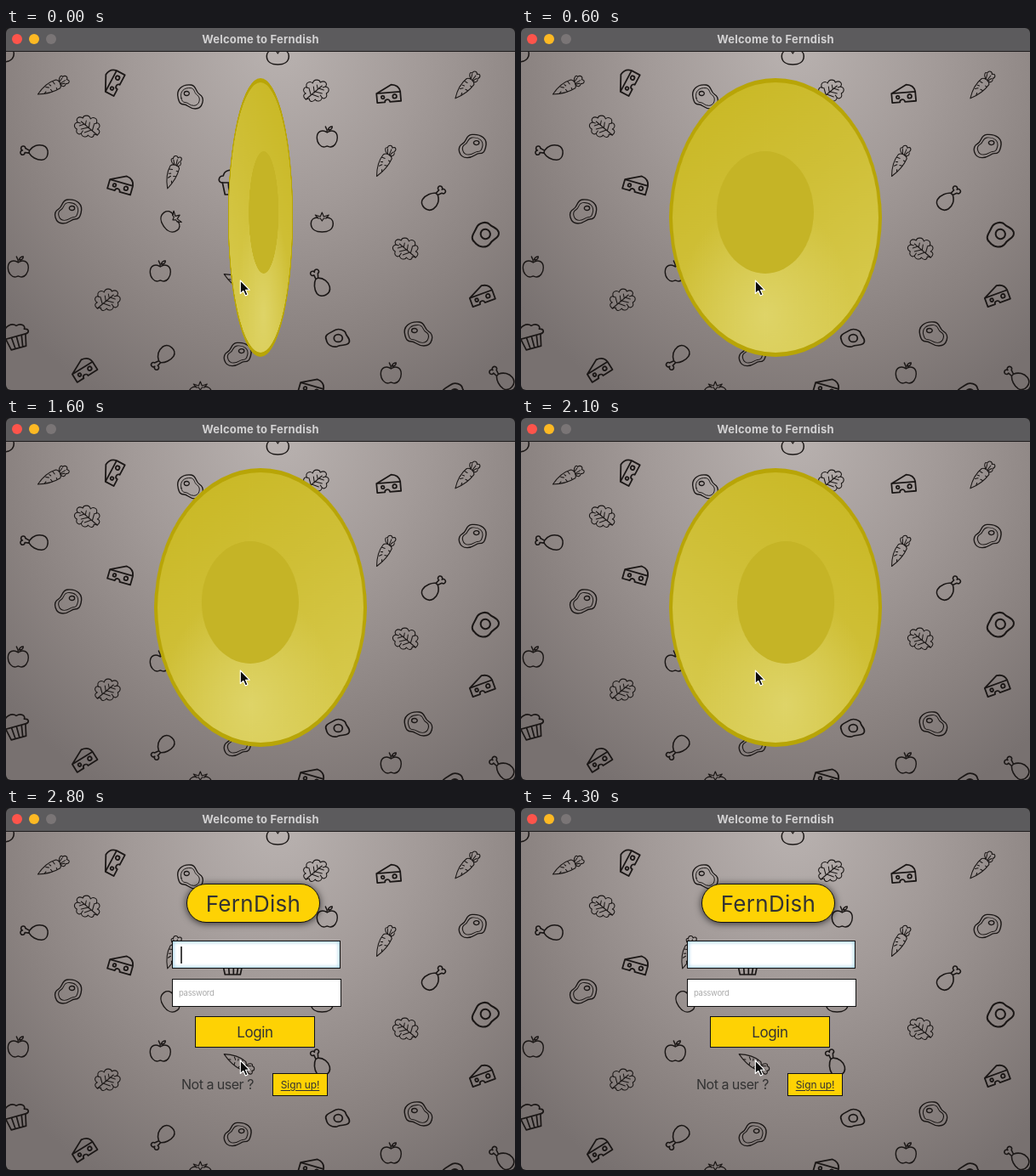
Write an HTML page that moves like this. It is 598 by 426 pixels and loops after 4.4 s.

```html
<!DOCTYPE html>
<html lang="en">
<head>
<meta charset="utf-8">
<title>Welcome to Ferndish</title>
<style>
  html, body { margin: 0; width: 100%; height: 100%; overflow: hidden; }
  body {
    position: relative;
    font-family: Inter, "Open Sans", sans-serif;
    color: #333;
    background: radial-gradient(ellipse 430px 470px at 320px 20px, #b9b2b0 0%, #a29a98 40%, #8a8280 75%, #787170 100%);
  }
  body > *, #login > * { position: absolute; box-sizing: border-box; }
  .scene { left: 0; top: 0; width: 598px; height: 426px; }
  #window { border-radius: 6px; box-shadow: 0 0 0 6px #1c1b1c; }

  #bar {
    left: 0; top: 0; width: 598px; height: 28px;
    background: #5c5b5d; border-bottom: 1px solid #1d1b1c;
    color: #d2d1d2; font-weight: 700; font-size: 13px; letter-spacing: .2px;
    line-height: 26px; text-align: center;
  }
  #bar i { position: absolute; top: 7px; width: 12px; height: 12px; border-radius: 50%; }

  .food { fill: none; stroke: #1b1716; stroke-linecap: round; stroke-linejoin: round; }

  #disc {
    left: 135px; top: 58.5px; width: 328px; height: 328px;
    border-radius: 50%; border: 5px solid #b8a507;
    background:
      radial-gradient(circle at 45% 86%, rgba(226, 217, 116, .75), rgba(226, 217, 116, 0) 42%),
      linear-gradient(150deg, #c9b824 5%, #cfbf36 45%, #d8cb50 95%);
    animation: spin 4.4s steps(44) infinite, intro 4.4s step-end infinite;
  }
  #disc i {
    position: absolute; left: 68px; top: 81px; width: 150px; height: 144px;
    border-radius: 50%; background: #c5b426;
  }
  /* one turn per second */
  @keyframes spin { from { transform: rotateY(-256.5deg); } to { transform: rotateY(1327.5deg); } }
  @keyframes intro { 0% { visibility: visible; } 63.636%, 100% { visibility: hidden; } }

  #login { animation: login 4.4s step-end infinite; }
  @keyframes login { 0% { visibility: hidden; } 63.636%, 100% { visibility: visible; } }

  .box { border: 1px solid #111; background: #fed204; text-align: center; white-space: nowrap; }
  #brand {
    left: 212px; top: 89px; width: 157px; height: 46px; border-radius: 23px;
    font-size: 26px; line-height: 46px; letter-spacing: .3px;
    box-shadow: 0 1px 9px rgba(0, 0, 0, .7);
  }
  .field { left: 195px; height: 33px; background: #fff; text-align: left; }
  #user { top: 156px; width: 198px; box-shadow: inset 0 0 4px 1px #9fd0ea; }
  #pass {
    top: 201px; width: 199px; padding-left: 7px;
    font-size: 9.5px; line-height: 31px; letter-spacing: -.3px; color: #aaa;
  }
  #caret {
    left: 205px; top: 163px; width: 1.5px; height: 20px; background: #444;
    animation: blink 4.4s step-end infinite;
  }
  @keyframes blink {
    0% { opacity: 1; }
    72.727% { opacity: 0; }
    84.091% { opacity: 1; }
    95.454%, 100% { opacity: 0; }
  }
  #enter { left: 222px; top: 245px; width: 141px; height: 37px; font-size: 17px; line-height: 36px; letter-spacing: -.4px; }
  #ask { left: 206px; top: 315px; font-size: 16px; line-height: 20px; letter-spacing: -.5px; white-space: nowrap; }
  #join {
    left: 313px; top: 312px; width: 65px; height: 27px;
    font-size: 12px; line-height: 26px; letter-spacing: -.1px;
    text-decoration: underline; text-underline-offset: 2px;
  }
</style>
</head>
<body>
<svg class="scene food" viewBox=".7 0 598 426">
  <defs>
    <g id="carrot" stroke-width="1.05">
      <path d="M-20 1C-12-4-2-7 6-6 10-4 10 3 7 5 0 6-10 5-20 1Z"/>
      <path d="M-8-3l3 2M-3 5l-1-3M2-6l1 4M-12 3l2-1M3 5l0-2M-3-4l1 2"/>
      <path d="M9-3C11-8 15-9 15-6 19-7 21-3 18-1 22 1 19 5 15 3 13 6 10 5 9 2M9 0L16-1M9-2L14-5M9 1L14 2"/>
    </g>
    <g id="cheese" stroke-width="1.8">
      <path d="M-14-1L4-10Q13-9 14-1ZM-14-1V10H-5A3 3 0 0 1 1 10H14V-1"/>
      <circle cx="-7" cy="4" r="1.8"/><circle cx="7" cy="4" r="2.3"/>
    </g>
    <g id="steak" stroke-width="1.3">
      <path id="cut" d="M-14 2C-17-9-9-15 1-14 8-13 6-6 11-3 18 1 15 14 6 14-1 14-3 9-7 9-12 9-13 6-14 2Z"/>
      <use href="#cut" transform="scale(.74)"/>
      <ellipse cx="-4" cy="-4" rx="3" ry="2.5"/>
    </g>
    <g id="lettuce" stroke-width="1.05">
      <path d="M-12 10C-16 7-15 4-12 3-17 0-14-5-11-4-13-10-7-12-4-9-3-14 4-14 5-10 10-13 14-9 11-5 16-4 16 1 12 3 14 8 9 10 7 8 6 13 0 13-1 10-4 14-8 13-8 9Z"/>
      <path d="M-12 10L7-6M-6 5L-8-2M-2 2L-3-5M2-2L1-7M-5 4L3 7M-1 1L7 3M3-3L9-1M-11-4l3 1M11-5l-3 1M7 8l-2-3"/>
    </g>
    <g id="apple" stroke-width="1.4">
      <path d="M0-5C-5-9-12-7-12 1-12 8-7 12-4 12-2 12-1 11 0 11 1 11 2 12 4 12 8 12 12 7 12 1 12-7 5-9 0-5ZM0-5Q0-9-2-12M1-8Q2-12 6-12Q6-8 1-8"/>
    </g>
    <g id="drum" stroke-width="1.6">
      <path d="M-6-1C-3-7 3-10 9-9 18-7 18 6 10 8 4 9-3 6-6 2L-11 2A2.6 2.6 0 1 1-14 0 2.6 2.6 0 1 1-11-3L-6-1V2"/>
    </g>
    <g id="tomato" stroke-width="1.5">
      <path d="M-5-6C-10-6-13-3-13 1-13 8-7 11 0 11S13 8 13 1C13-3 10-6 5-6"/>
      <path d="M-8-9L-2-7 0-12 2-7 8-9 5-5 2-5 0-2-2-5-5-5Z" stroke-width="1.2"/>
    </g>
    <g id="muffin" stroke-width="1.7">
      <path d="M-12 0L-9 14H9L12 0M-5 1L-4 14M1 1V14M7 1L5 14"/>
      <path d="M-12 0C-18 0-17-8-11-8-10-15 0-17 4-12 10-14 15-9 12-6 18-5 17 0 12 0Z"/>
    </g>
    <g id="egg" stroke-width="1.8">
      <path d="M-13 2C-16-5-8-7-4-10 1-14 9-11 10-6 11-2 15 0 14 5 12 11 5 8 0 11-6 13-12 9-13 2Z"/>
      <circle cx="1" r="5"/>
    </g>
  </defs>

  <use href="#carrot" transform="translate(56 69) rotate(-24)"/>
  <use href="#carrot" transform="translate(197 170) rotate(-68)"/>
  <use href="#carrot" transform="translate(446 157) rotate(-58)"/>
  <use href="#carrot" transform="translate(542 68) rotate(-45)"/>
  <use href="#carrot" transform="translate(274 300) rotate(34)"/>

  <use href="#cheese" transform="translate(125 63) rotate(-62)"/>
  <use href="#cheese" transform="translate(136 183) rotate(16)"/>
  <use href="#cheese" transform="translate(450 77) rotate(-5)"/>
  <use href="#cheese" transform="translate(559 314) rotate(-20)"/>
  <use href="#cheese" transform="translate(91 401) rotate(-32)"/>
  <use href="#cheese" transform="translate(360 422) rotate(16)"/>

  <use href="#steak" transform="translate(217 81)"/>
  <use href="#steak" transform="translate(549 139) scale(-1.08 .97)"/>
  <use href="#steak" transform="translate(74 216) scale(-1.05 1)"/>
  <use href="#steak" transform="translate(273 384) scale(-1.08 .97)"/>
  <use href="#steak" transform="translate(485 360) scale(1.1 1)"/>

  <use href="#lettuce" transform="translate(365 74)"/>
  <use href="#lettuce" transform="translate(96 116) scale(-1 1)"/>
  <use href="#lettuce" transform="translate(120 320)"/>
  <use href="#lettuce" transform="translate(470 260) scale(-1 1)"/>

  <use href="#apple" transform="translate(378 128)"/>
  <use href="#apple" transform="translate(15 281)"/>
  <use href="#apple" transform="translate(182 286)"/>
  <use href="#apple" transform="translate(453 406)"/>

  <use href="#drum" transform="translate(34 146) rotate(8)"/>
  <use href="#drum" transform="translate(503 200) rotate(135)"/>
  <use href="#drum" transform="translate(369 300) rotate(65)"/>
  <use href="#drum" transform="translate(185 388) rotate(-47)"/>
  <use href="#drum" transform="translate(583 412) rotate(42)"/>

  <use href="#tomato" transform="translate(195 227) rotate(55)"/>
  <use href="#tomato" transform="translate(372 229)"/>
  <use href="#tomato" transform="translate(320 32)"/>
  <use href="#tomato" transform="translate(-3 29)"/>
  <use href="#tomato" transform="translate(229 428)"/>

  <use href="#muffin" transform="translate(267 182)"/>
  <use href="#muffin" transform="translate(12 363) rotate(-15)"/>

  <use href="#egg" transform="translate(563 243) rotate(-30) scale(1.12 1.15)"/>
  <use href="#egg" transform="translate(390 365) scale(1 .88)"/>
  <use href="#egg" transform="translate(527 430)"/>
</svg>

<div id="disc"><i></i></div>

<div id="login" class="scene">
  <div id="brand" class="box">FernDish</div>
  <div id="user" class="box field"></div>
  <div id="caret"></div>
  <div id="pass" class="box field">password</div>
  <div id="enter" class="box">Login</div>
  <div id="ask">Not a user ?</div>
  <div id="join" class="box">Sign up!</div>
</div>

<div id="bar">
  <i style="left:7px;background:#fd544b"></i>
  <i style="left:27px;background:#fdb924"></i>
  <i style="left:47px;background:#7a7576"></i>
  Welcome to Ferndish
</div>

<svg class="scene" viewBox=".7 0 598 426">
  <path d="M276 297V312.500L279.500 309.300 282 315 284.700 313.800 282.200 308.300H287Z" fill="#0c0c0c" stroke="#fff" stroke-width="1.100" stroke-linejoin="round"/>
</svg>
<div id="window" class="scene"></div>
</body>
</html>
```
